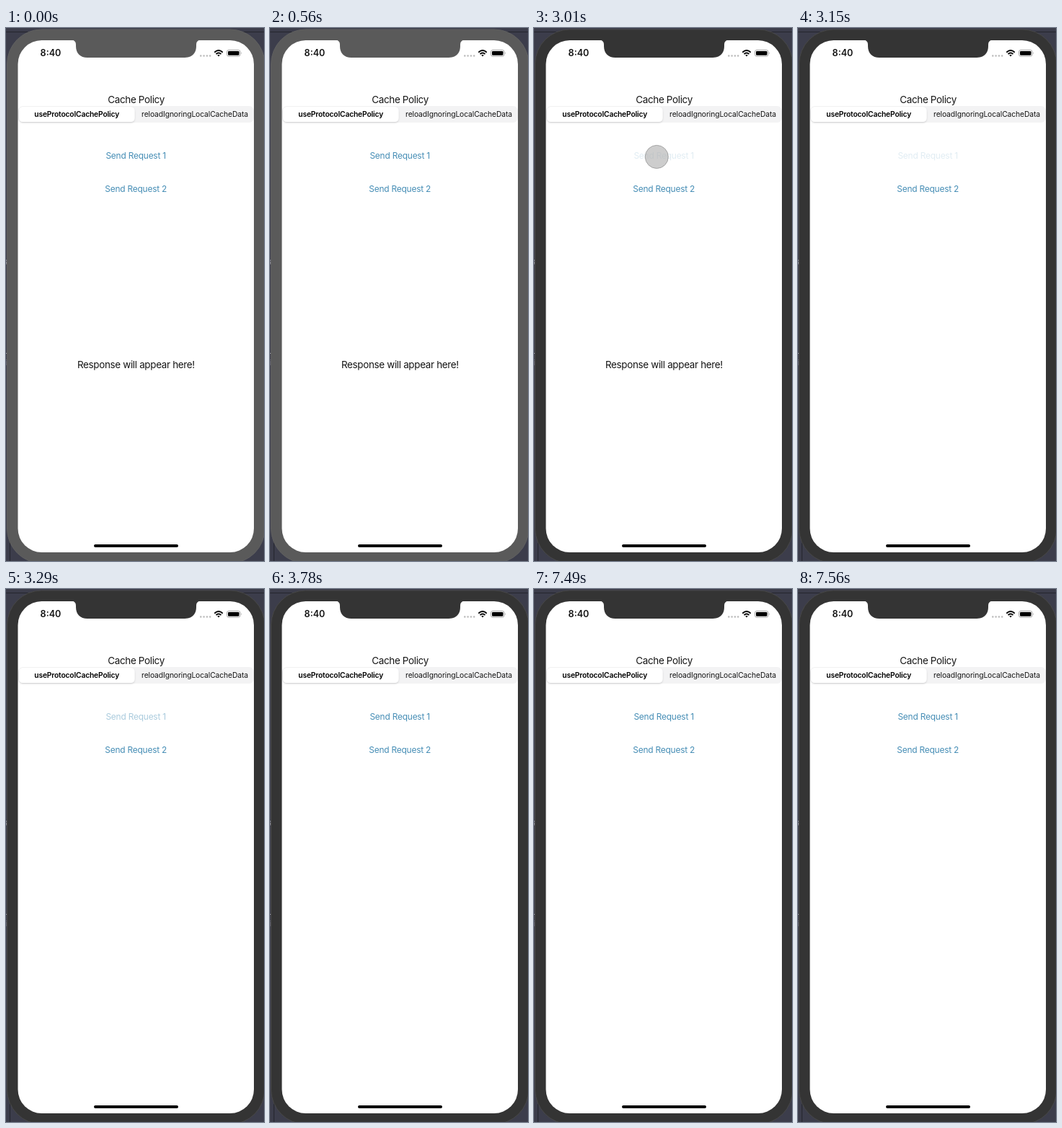
Recreate the animation shown at these times as an HTML page. Size 358 px wide and 738 px high, loop 8000 ms.

```html
<!DOCTYPE html>
<html lang="en">
<head>
<meta charset="utf-8">
<title>Cache policy demo</title>
<style>
  html, body { margin: 0; width: 100%; height: 100%; overflow: hidden; background: #3c3d4b; }
  svg { display: block; }
  text { font: 13.46px Inter, sans-serif; fill: #151515; text-anchor: middle; letter-spacing: -.34px; }
  .button { font-size: 11.9px; letter-spacing: -.19px; fill: #458db5; }
  .segment { font-size: 10.3px; letter-spacing: -.1px; }
  .selected { font-weight: 600; letter-spacing: -.17px; fill: #000; }
  .clock { font-size: 12.6px; font-weight: 600; letter-spacing: 0; }
  .behind { font-size: 10px; fill: #c4c4cc; text-anchor: end; }
</style>
</head>
<body>
<svg width="358" height="738" viewBox="0 0 358 738">
  <defs>
    <filter id="shadow" x="-10%" y="-30%" width="120%" height="180%">
      <feDropShadow dx="0" dy="1.2" stdDeviation="1.3" flood-opacity=".16"/>
    </filter>
  </defs>

  <!-- Desktop behind the phone -->
  <path d="M0 5.5H358M5.5 700V738" stroke="#24252d"/>
  <g class="behind">
    <text class="behind" x="2" y="327">s</text>
    <text class="behind" x="2" y="454">-</text>
    <text class="behind" x="2" y="467">i</text>
  </g>

  <!-- Phone body, screen and notch -->
  <rect id="bezel" x="1.5" y="2" width="357.5" height="739" rx="48" stroke-width="1"/>
  <rect x="16.5" y="17" width="327.5" height="709" rx="33" fill="#fff"/>
  <path id="notch" d="M91 16.5Q97 17 97 23V25C97 35 103 41 113 41H248C258 41 264 35 264 25V23Q264 17 270 16.5Z"/>

  <!-- Status bar -->
  <text class="clock" x="62" y="39.4">8:40</text>
  <path d="M270.3 38.4h14" stroke="#b9b9b9" stroke-width="2.5" stroke-linecap="round" stroke-dasharray="0 4.3"/>
  <g fill="none" stroke="#000" stroke-width="1.9">
    <path d="M289.3 33.7Q295 28.5 300.7 33.7M291.5 36.1Q295 33 298.5 36.1"/>
    <path d="M293.2 37.6Q295 36.2 296.8 37.6L295 39.4Z" fill="#000" stroke="none"/>
  </g>
  <rect x="306.5" y="30.5" width="18.5" height="8.7" rx="2.5" fill="none" stroke="#a0a0a0" stroke-width=".9"/>
  <rect x="308" y="32" width="15.5" height="5.8" rx="1.3"/>
  <path d="M326.2 33.3q1.5 1.5 0 3Z" fill="#a0a0a0"/>

  <!-- Content -->
  <text x="180.6" y="103.7">Cache Policy</text>
  <rect x="17" y="108" width="327" height="23" rx="6.5" fill="#f3f3f4"/>
  <rect x="18" y="109" width="160.5" height="21" rx="5.5" fill="#fff" filter="url(#shadow)"/>
  <text class="segment selected" x="98.2" y="123.2">useProtocolCachePolicy</text>
  <text class="segment" x="262" y="123.2">reloadIgnoringLocalCacheData</text>
  <text id="first" class="button" x="180.2" y="181">Send Request 1</text>
  <text class="button" x="180.2" y="227">Send Request 2</text>
  <text id="response" x="180.4" y="470.6">Response will appear here!</text>
  <rect x="122" y="715" width="117" height="4" rx="2"/>
  <circle id="touch" cx="170.3" cy="178.4" r="16" fill="#b4b4b4" fill-opacity=".66" stroke="#a5a5a5"/>
</svg>
<script>
const LOOP = 8000, STEP = 70, PRESS = 3010, RELEASE = 3150, FADE = 350, DIM = 0.16;
const part = id => document.getElementById(id);
const [bezel, notch, first, response, touch] =
  ['bezel', 'notch', 'first', 'response', 'touch'].map(part);
const show = (element, visible) => element.setAttribute('visibility', visible ? 'visible' : 'hidden');

function buttonOpacity(time) {
  if (time < PRESS) return 1;
  const elapsed = Math.floor((time - RELEASE) / STEP) * STEP;
  const p = Math.min(1, Math.max(0, elapsed / FADE));
  return DIM + (1 - DIM) * p * p * (3 - 2 * p);
}

function render(time) {
  const active = time >= PRESS;
  const body = active ? '#343434' : '#5a5a5a';
  bezel.setAttribute('fill', body);
  bezel.setAttribute('stroke', active ? '#484848' : '#606060');
  notch.setAttribute('fill', body);
  first.setAttribute('opacity', buttonOpacity(time));
  show(response, time < RELEASE);
  show(touch, active && time < RELEASE);
}

const start = performance.now();
function tick() {
  render((performance.now() - start) % LOOP);
  requestAnimationFrame(tick);
}
tick();
</script>
</body>
</html>
```
